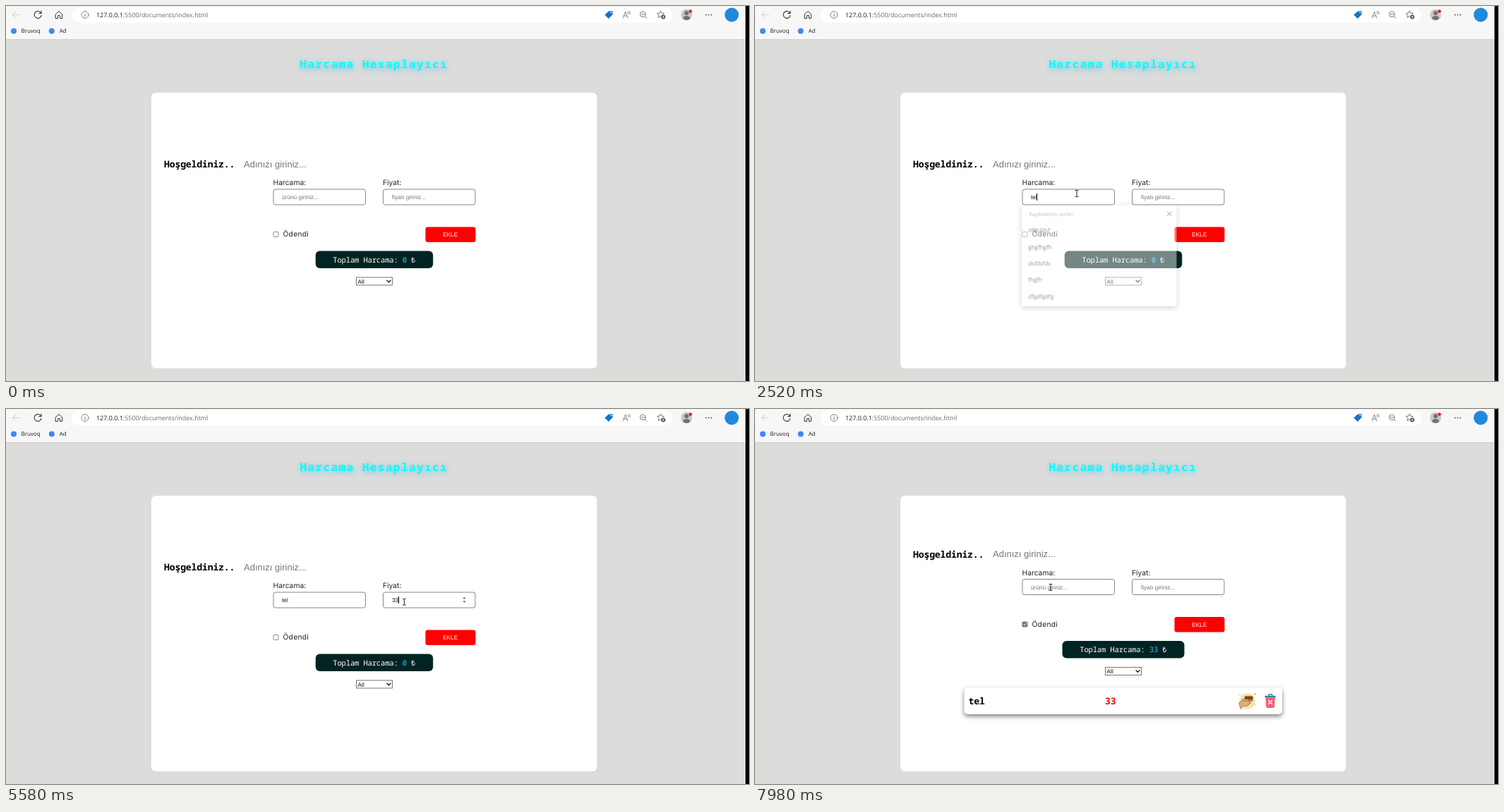
Write an HTML page that moves like this. It is 1053 px wide and 532 px high and loops after 8000 ms.

```html
<!DOCTYPE html>
<html lang="tr">
<head>
<meta charset="utf-8">
<title>Harcama Hesaplayıcı</title>
<style>
html, body { margin: 0; width: 100%; height: 100%; overflow: hidden; background: #dcdcdb; }
svg { display: block; width: 1053px; height: 532px; }
text { text-rendering: geometricPrecision; white-space: pre; }
.ui { font-family: "Open Sans", sans-serif; font-size: 8px; fill: #1c1c1c; }
.mono { font-family: "Noto Sans Mono", monospace; }
.title { font-size: 15.8px; font-weight: 700; letter-spacing: 1.57px; fill: #0ff; filter: drop-shadow(1px 2px 4px #4cc8ee); }
.bold { font-size: 13.2px; font-weight: 700; letter-spacing: -.2px; }
.total { font-size: 10.6px; letter-spacing: -.2px; fill: #fff; }
.label { font-family: Inter, sans-serif; font-size: 10.3px; fill: #222; }
.field { font-family: "Liberation Sans", Arial, sans-serif; font-size: 8.3px; fill: #111; }
.hint { fill: #757575; }
.box { fill: #fff; stroke: #858585; }
.line { fill: none; stroke: #333; stroke-linecap: round; stroke-linejoin: round; }
#menu { filter: drop-shadow(0 2px 4px rgba(0,0,0,.38)); }
#row rect.card { filter: drop-shadow(0 3px 3px rgba(0,0,0,.5)); }
</style>
</head>
<body>
<svg viewBox="0 0 1053 532">
  <rect width="1053" height="532" fill="#dcdcdb"/>

  <!-- browser bar -->
  <rect width="1053" height="48" fill="#f7f7f7"/>
  <rect y="47" width="1053" height="1" fill="#d0d0d0"/>
  <rect x="93" y="2" width="852" height="21.5" rx="10.75" fill="#fff"/>
  <g class="line">
    <path d="M19.5 12.5H9.5m4.5-4.5-4.5 4.5 4.5 4.5" stroke="#cfcfcf"/>
    <path d="M49.6 10.2a5 5 0 1 0 .4 3.2M50 7v3.5h-3.5" stroke-width="1.1"/>
    <path d="M70.5 11.5 75 7.5l4.5 4v6h-3v-4h-3v4h-3z"/>
    <circle cx="112" cy="12.5" r="5" stroke="#777" stroke-width=".9"/>
    <path d="M112 12v3M112 10v.1" stroke="#666"/>
    <path d="M874.5 17l3.3-9 3.3 9m-5.6-3h4.5M881 8q1.6 1.4 1 3.400M883 7q2 1.800 1.300 4.500" stroke="#666" stroke-width=".8"/>
    <circle cx="902.500" cy="11.700" r="3.800" stroke="#666" stroke-width=".9"/>
    <path d="M905.300 14.500l2.700 2.700M900.700 11.700h3.600" stroke="#666" stroke-width=".9"/>
    <path d="M931 16l-3.200-1.500-3.300 2 .8-3.600-2.600-2.500 3.500-.4 1.500-3.200 1.500 3.200 3.600.4-1.500 1.500" stroke="#666" stroke-width=".9"/>
  </g>
  <circle cx="931.500" cy="15.500" r="3" fill="#555"/>
  <path d="M930 15.500h3M931.500 14v3" stroke="#fff" stroke-width=".7"/>
  <path d="M848.500 12.500 854 7.500l5.500-.4.300 4.900-5.800 6z" fill="#1273cf"/>
  <circle cx="857.600" cy="9.200" r=".9" fill="#fff"/>
  <circle cx="964.500" cy="12.500" r="8" fill="#cbc9c7"/>
  <circle cx="964.500" cy="10" r="3.100" fill="#77716d"/>
  <path d="M959.500 18q0-4 5-4t5 4q-5 4-10 0z" fill="#77716d"/>
  <circle cx="970" cy="7.500" r="2.200" fill="#d91c1c"/>
  <path d="M991.500 12.500h1.500m2.200 0h1.500m2.200 0h1.500" stroke="#333" stroke-width="1.500"/>
  <circle cx="1028.500" cy="12.500" r="10" fill="#2189dc"/>
  <circle cx="11" cy="35.500" r="4" fill="#4285f4"/>
  <circle cx="64.800" cy="35.500" r="4" fill="#4285f4"/>
  <text class="ui" x="128" y="15.800" style="font-size:8.950px">127.0.0.1<tspan fill="#6b6b6b">:5500/documents/index.html</tspan></text>
  <text class="ui" x="21.500" y="38.400">Bruvoq</text>
  <text class="ui" x="75.800" y="38.400">Ad</text>

  <!-- page -->
  <text class="mono title" x="416.500" y="88.200">Harcama Hesaplayıcı</text>
  <rect x="206" y="123" width="631.500" height="391" rx="6" fill="#fff"/>

  <g id="form">
    <text class="mono bold" x="224" y="229">Hoşgeldiniz..</text>
    <text class="field hint" x="337" y="228.500" style="font-size:13px">Adınızı giriniz...</text>
    <text class="label" x="378.500" y="254">Harcama:</text>
    <text class="label" x="534" y="254">Fiyat:</text>
    <rect class="box" x="379" y="260" width="130.500" height="22" rx="3"/>
    <rect class="box" x="534.500" y="260" width="130.500" height="22" rx="3"/>
    <text class="field" id="item" x="391" y="274"></text>
    <text class="field" id="price" x="547" y="274"></text>
    <path id="spin" d="M647.300 269.300l2.200-2.600 2.200 2.600zM647.300 272.300l2.200 2.600 2.200-2.600z" fill="#6b6b6b"/>
    <rect id="caret" y="266" width="1" height="10"/>
    <rect id="tick" x="379" y="320.500" width="7" height="7" rx="1.200" stroke="#767676" stroke-width=".9"/>
    <path id="mark" class="line" d="M380.700 324l1.300 1.400 2.500-3" style="stroke:#fff"/>
    <text class="label" x="392.500" y="327.300" letter-spacing=".25">Ödendi</text>
    <rect x="594.500" y="313.500" width="71" height="21.500" rx="3" fill="#f00"/>
    <text class="field" x="619" y="327.200" style="fill:#fff">EKLE</text>
    <rect id="pill" y="347.500" height="24.500" rx="6" fill="#012423"/>
    <text class="mono total" x="521.800" y="363.500" text-anchor="middle">Toplam Harcama: <tspan id="sum" fill="#35b8f2"></tspan> ₺</text>
    <rect class="box" x="496.500" y="385" width="51" height="11" style="stroke:#767676"/>
    <text class="field" x="498.500" y="393.500">All</text>
    <path class="line" d="M540 389.300l2.500 2.500 2.500-2.500" style="stroke:#111;stroke-width:1.300"/>
  </g>

  <g id="row">
    <rect class="card" x="296.500" y="395" width="450.500" height="38" rx="5" fill="#fff"/>
    <text class="mono bold" x="302.500" y="419">tel</text>
    <text class="mono bold" x="496" y="419" fill="#e80c0c">33</text>
    <circle cx="697.500" cy="414.500" r="11.300" fill="#ebe9b0"/>
    <path d="M694 407h11.500v7.500H694z" fill="#a8652c"/>
    <path d="M694 409h11.500v1.800H694z" fill="#59361d"/>
    <path d="M686 417l6-6 5 .5 4 2.500-1 2 3 .5-5 4.500-6 .5-4 3.500z" fill="#e3ac78" stroke="#8d5a35" stroke-width=".7"/>
    <path d="M691 415l4-1.500 4 1.500" class="line" style="stroke:#8d5a35;stroke-width:.7"/>
    <g fill="#e8a13a"><circle cx="708.500" cy="404.500" r="1.200"/><circle cx="690" cy="425.500" r=".9"/><circle cx="687" cy="406" r=".7"/><circle cx="709" cy="420" r=".7"/></g>
    <path d="M728 407v-2h5v2" class="line" style="stroke:#2e86a8;stroke-width:1.300"/>
    <rect x="722.500" y="406.800" width="15.500" height="2.500" rx="1" fill="#2e86a8"/>
    <path d="M723.500 409.300h13.500l-.8 13q-.1 1.700-1.700 1.700h-8.500q-1.600 0-1.700-1.700z" fill="#fa5c74"/>
    <path d="M727.700 413.500l5 5m0-5-5 5" class="line" style="stroke:#fff;stroke-width:1.500"/>
  </g>

  <g id="menu">
    <rect x="378" y="282.500" width="219.500" height="143.500" rx="2.500" fill="#fff"/>
    <text class="ui" x="388.500" y="297.500" style="font-size:7.100px;fill:#707070">Kaydedilmiş veriler</text>
    <path class="line" d="M584.300 291.700l6 6m0-6-6 6"/>
  </g>

  <g id="cursor">
    <path id="arrow" d="M0 0v10l2.300-2 1.700 3.500 1.700-.8L4.100 7.300h3.100z" fill="#fff" stroke="#111" stroke-width=".8"/>
    <path id="beam" class="line" d="M-2-4.500h1.300L0-4l.7-.5H2M0-4v8M-2 4.500h1.300L0 4l.7.500H2" style="stroke:#222"/>
    <path id="hand" d="M-.9.800Q0-.6.900.800V4l3.600.8q1 .3.900 1.500L4.700 11H-.8L-3.700 7q.3-1.500 2.800.2z" fill="#fff" stroke="#111" stroke-width=".8"/>
  </g>
  <rect x="1048" width="5" height="532"/>
</svg>
<script>
const LOOP = 8000, ADDED = 6660, SHIFT = 18.5;
const $ = id => document.getElementById(id);
const show = (id, on) => $(id).style.display = on ? '' : 'none';
const within = (t, spans) => spans.some(([a, b]) => t >= a && t < b);

['dfdsfdsf', 'ghgfhgfh', 'dsfdsfds', 'fhgfh', 'dfgdfgdfg'].forEach((word, i) => {
  const row = document.createElementNS('http://www.w3.org/2000/svg', 'text');
  row.setAttribute('class', 'ui');
  row.setAttribute('x', 387.3);
  row.setAttribute('y', 321.2 + i * 23.35);
  row.textContent = word;
  $('menu').append(row);
});

const inOut = p => p * p * (3 - 2 * p);
const out = p => 1 - (1 - p) ** 2;

// start, end, steps, from, bend, to, easing
const moves = [
  [110, 910, 13, [1007, 528], [560, 225], [456, 266], inOut],
  [3670, 4450, 12, [456, 266], [510, 257], [561, 264], inOut],
  [4520, 4520, 1, [561, 264], [558, 265], [557, 265], out],
  [5500, 6100, 9, [557, 265], [585, 300], [632, 323], inOut],
  [6660, 6770, 2, [632, 323], [608, 322], [588, 322], out],
  [6770, 7440, 11, [588, 322], [470, 318], [381, 302], out],
  [7580, 7980, 7, [381, 302], [398, 280], [419, 253], inOut]
];

// time, value
const itemText = [[0, ''], [2450, 't'], [2520, 'tel'], [ADDED, '']];
const priceText = [[0, ''], [5110, '3'], [5440, '33'], [ADDED, '']];
const menuFade = [[0, 0], [1040, .25], [1113, .55], [1187, .85], [1260, 1], [2450, .75], [2520, .45], [2585, .18], [2650, 0]];
const last = (list, t) => list.filter(e => e[0] <= t).pop();

function pointer(t) {
  const move = last(moves, t);
  if (!move) return null;
  const [start, end, steps, a, b, c, ease] = move;
  const k = end > start ? Math.min(steps - 1, Math.floor((t - start) / (end - start) * (steps - 1))) : steps - 1;
  const p = ease((k + 1) / steps), q = 1 - p;
  return a.map((v, i) => q * q * v + 2 * p * q * b[i] + p * p * c[i]);
}

function drawPointer(t, lift) {
  const pos = pointer(t);
  show('cursor', pos);
  if (!pos) return;
  const [x, y] = pos, fy = y + lift;
  const beam = fy > 260 && fy < 282 && (x > 379 && x < 510 || x > 534 && x < 665);
  const hand = x > 594 && x < 666 && fy > 313 && fy < 335;
  show('beam', beam);
  show('hand', hand);
  show('arrow', !beam && !hand);
  $('cursor').setAttribute('transform', `translate(${x.toFixed(1)} ${y.toFixed(1)})`);
}

function fill(id, value, hint) {
  const el = $(id), text = value || hint;
  if (el.textContent !== text) el.textContent = text;
  el.classList.toggle('hint', !value);
  return value ? el.getComputedTextLength() : 0;
}

function render(t) {
  const added = t >= ADDED, lift = added ? SHIFT : 0, checked = t >= 7580;
  const itemEnd = 391 + fill('item', last(itemText, t)[1], 'ürünü giriniz...');
  const priceEnd = 547 + fill('price', last(priceText, t)[1], 'fiyatı giriniz...');
  const inItem = within(t, [[1040, 1580], [2110, 3050], [3520, 4050]]);
  const inPrice = within(t, [[4380, 4910], [5110, 6300]]);

  $('form').setAttribute('transform', `translate(0 ${-lift})`);
  show('caret', inItem || inPrice);
  $('caret').setAttribute('x', Math.floor(inItem ? itemEnd : priceEnd));
  show('spin', t >= 4160 && !added);
  show('mark', checked);
  $('tick').setAttribute('fill', checked ? '#767676' : '#fff');

  const width = added ? 173 : 166.5;
  $('pill').setAttribute('x', 522 - width / 2);
  $('pill').setAttribute('width', width);
  $('sum').textContent = added ? '33' : '0';
  show('row', added);

  const fade = last(menuFade, t)[1];
  show('menu', fade);
  $('menu').style.opacity = fade;
  drawPointer(t, lift);
}

const origin = performance.now();
function tick() {
  render((performance.now() - origin) % LOOP);
  requestAnimationFrame(tick);
}
tick();
</script>
</body>
</html>
```
